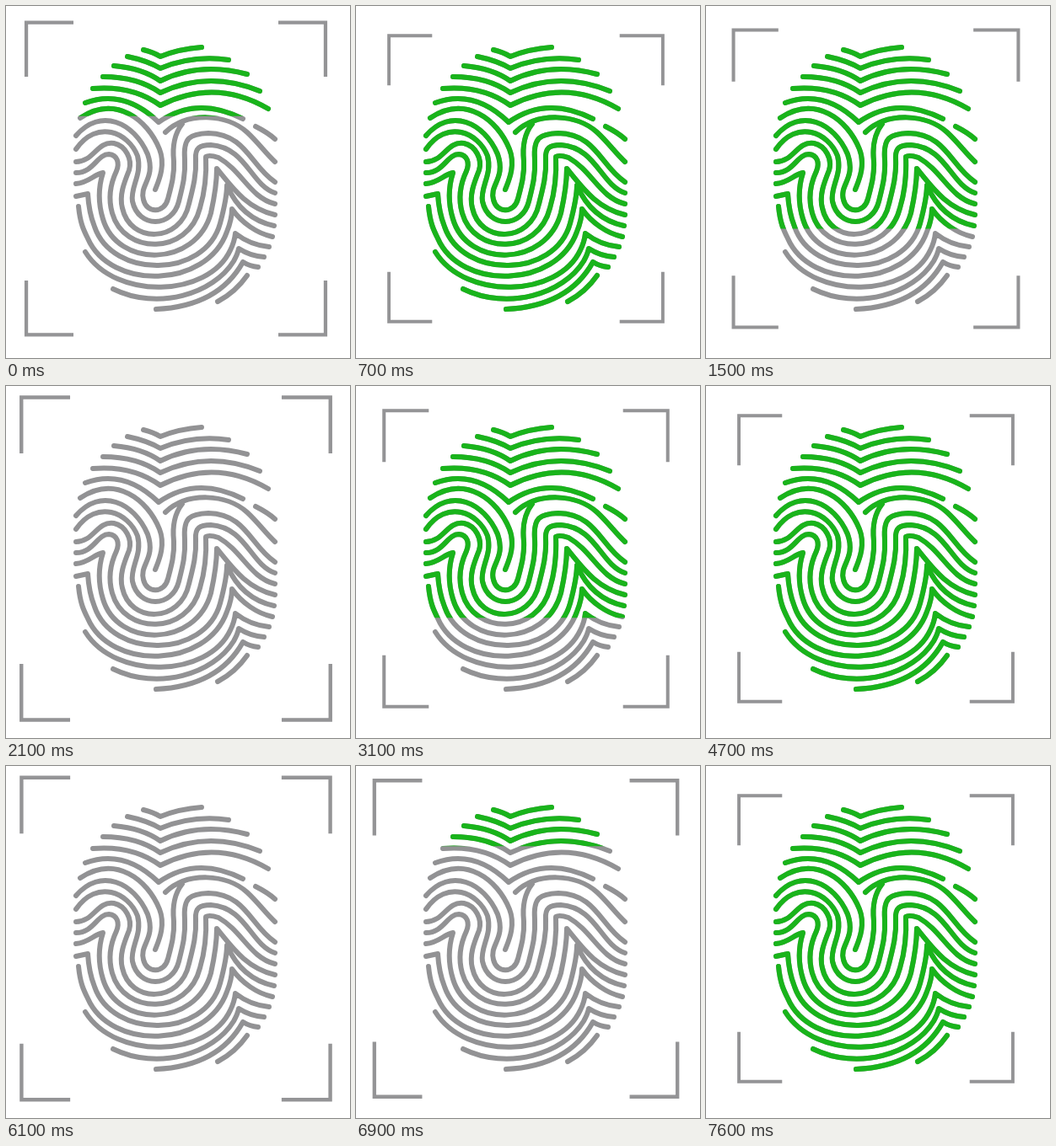
An HTML page for the animation above (7700 ms loop, 408 by 418 pixels).

```html
<!DOCTYPE html>
<html lang="en">
<head>
<meta charset="utf-8">
<title>Fingerprint scan</title>
<style>
html, body { margin: 0; width: 100%; height: 100%; overflow: hidden; background: #fff; }
svg { display: block; }
path { fill: none; }
</style>
</head>
<body>
<svg width="408" height="418" viewBox="0 0 408 418">
  <defs>
    <clipPath id="scan"><rect id="reveal" width="408" height="0"/></clipPath>
    <path id="print" stroke-width="6" stroke-linecap="round" stroke-linejoin="round" d="
      M163 52Q175 55 183 60Q205 51 232 49
      M144 60Q168 65 183 74Q222 58 264 64
      M128 71Q162 74 183 89Q230 66 286 81
      M115 84Q156 84 183 103Q240 76 301 101
      M103 98Q150 94 183 118Q248 85 311 122
      M94 115Q140 98 181 138Q226 106 281 134
      M296 143Q310 150 319 158
      M88 133C130 105 168 135 182 170C190 190 180 210 177 218
      M189 150C215 125 262 128 286 150C300 163 308 175 319 185
      M83 154C112 120 152 138 168 176C178 205 158 212 163 230C167 247 188 246 192 229C196 214 200 200 199 184C197 165 201 150 209 140
      M83 170C108 134 145 150 156 178C162 200 147 215 150 232C157 264 197 264 205 232C210 212 213 200 212 182C210 156 218 152 240 151C285 152 290 190 319 209
      M83 185C104 185 108 160 128 163C142 166 150 182 146 195C140 210 134 225 138 240C147 282 207 282 217 235C222 215 226 200 225 182C224 168 230 165 243 165C285 168 290 212 319 222
      M83 198C104 198 108 176 122 176C132 177 135 186 131 196C122 215 122 232 126 246C140 296 216 296 230 240C236 220 238 200 237 179C240 177 246 178 252 180C280 196 290 228 319 235
      M83 211C98 210 104 200 115 198C108 220 111 240 115 253C132 311 225 311 243 246C247 228 250 210 250 193C268 215 285 240 319 248
      M83 226L97 223C98 240 101 252 105 262C126 324 236 324 254 258C258 243 262 225 262 213C272 236 290 255 318 261
      M86 238C88 258 92 266 97 276C124 338 238 336 262 268C266 258 268 250 268 241C280 258 298 270 316 274
      M94 292C130 350 240 346 266 290Q271 280 272 270Q290 284 312 286
      M127 336C180 362 246 342 270 303Q275 294 276 288Q290 297 306 298
      M178 360C222 358 260 342 281 304Q289 309 299 310
      M251 351Q272 340 286 320"/>
  </defs>
  <use href="#print" stroke="#929294"/>
  <use href="#print" stroke="#19b41b" clip-path="url(#scan)"/>
  <path id="frame" stroke="#949496" stroke-width="4.4" d="
    M-125.5-191.5H-183.3V-125M125.5-191.5H183.3V-125
    M-125.5 191.5H-183.3V125M125.5 191.5H183.3V125"/>
</svg>
<script>
const LOOP = 7700, STEP = 100;
// [time, phase]: even whole phases sweep down, odd ones sweep back up
const keys = [
  [0, .4325], [1600, 1.512], [3100, 2.5675], [3690, 2.98],
  [3700, .224], [4000, .407], [5600, 1.454], [7200, 2.597], [7700, 2.95]
];
const reveal = document.getElementById('reveal');
const frame = document.getElementById('frame');

const ease = u => u < .5 ? 8 * u ** 4 : 1 - 8 * (1 - u) ** 4;

function progress(t) {
  const i = keys.findIndex(k => k[0] > t);
  const [t0, a] = keys[i - 1], [t1, b] = keys[i];
  const phase = a + (b - a) * (t - t0) / (t1 - t0);
  const p = ease(phase % 1);
  return Math.floor(phase) % 2 ? 1 - p : p;
}

function draw(now) {
  const t = Math.floor(now % LOOP / STEP) * STEP;
  const p = progress(t);
  reveal.setAttribute('height', 39 + 328 * p);
  frame.setAttribute('transform', `translate(201.5 205) scale(${1 - .114 * p})`);
}

const start = performance.now();
function tick() {
  draw(performance.now() - start);
  requestAnimationFrame(tick);
}
tick();
</script>
</body>
</html>
```
